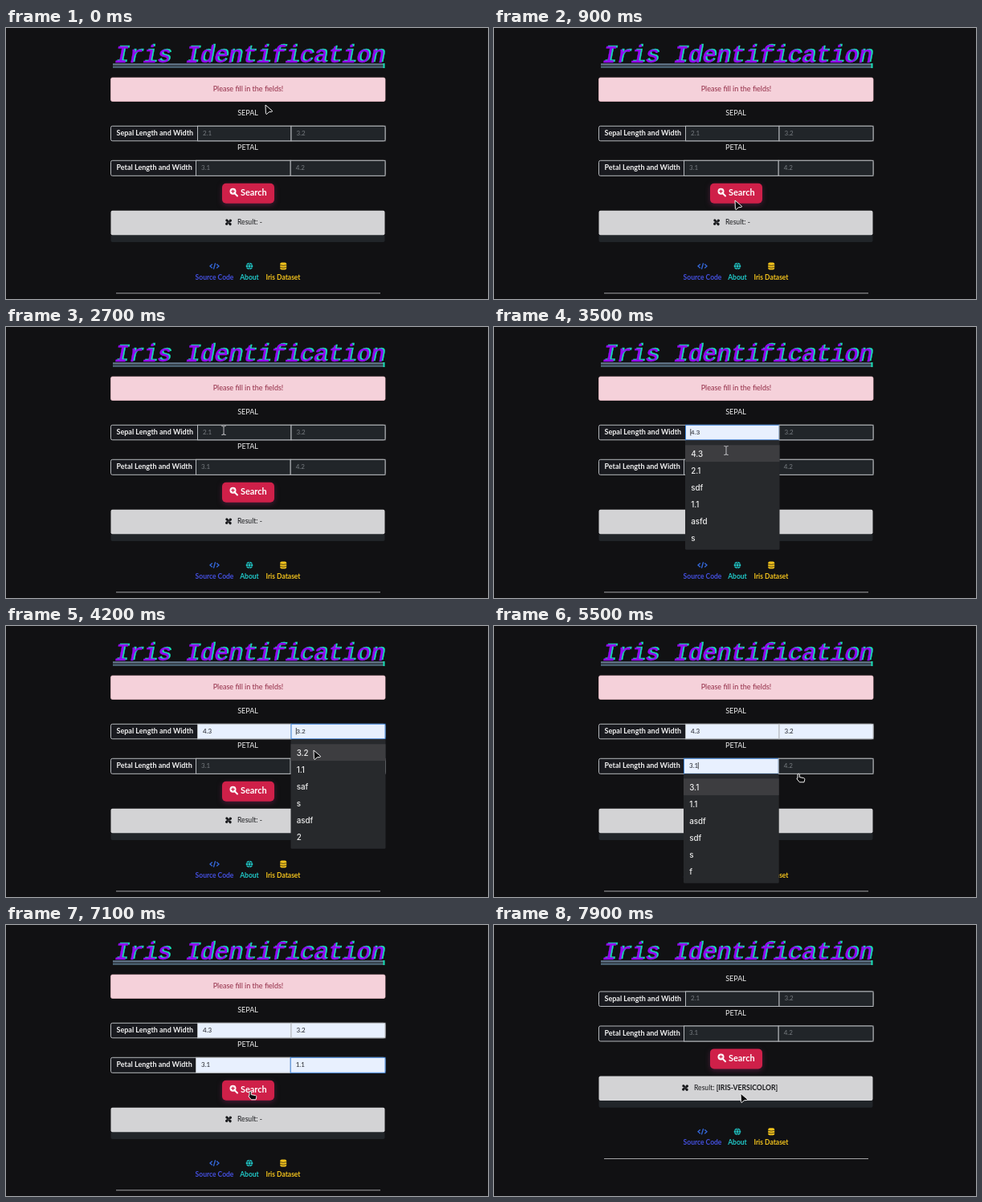
An HTML page for the animation above (8 s loop, 600 by 338 pixels).

```html
<!DOCTYPE html>
<html lang="en">
<head>
<meta charset="utf-8">
<title>Iris Identification</title>
<style>
  html, body { margin: 0; width: 100%; height: 100%; overflow: hidden; background: #111113; }
  svg { display: block; width: 600px; height: 338px; font: 9px Lato, sans-serif; }
  .title { font: italic 29.5px "Liberation Mono", monospace; stroke-width: .4; }
  .bold { font-weight: 700; }
  .mid { text-anchor: middle; }
  .list { font: 500 9.8px Inter, sans-serif; fill: #eee; }
  .link { font-size: 8.5px; font-weight: 700; }
  #button { filter: drop-shadow(0 2px 3px #7a1f5588); }
</style>
</head>
<body>
<svg viewBox="0 0 600 338">
  <rect width="600" height="338" fill="#111113"/>
  <g class="title">
    <text x="137" y="42" fill="#16dfb4" stroke="#16dfb4">Iris Identification</text>
    <text x="135" y="42.5" fill="#9208f0" stroke="#9208f0">Iris Identification</text>
  </g>
  <path d="M133 45.4H471" stroke="#64798d" stroke-width="2.2"/>
  <path d="M133 48.6H471" stroke="#526b7c" stroke-width="2.2"/>
  <path d="M470.5 44V50" stroke="#16dfb4" stroke-width="2"/>

  <g id="alert">
    <rect x="130.5" y="62" width="341.5" height="29.5" rx="2" fill="#f5d1da" stroke="#f3c3cd" stroke-width=".7"/>
    <text class="mid" x="301.5" y="79" fill="#922b45">Please fill in the fields!</text>
  </g>

  <g id="page">
    <g fill="#eee">
      <text class="mid" x="301" y="109">SEPAL</text>
      <text class="mid" x="301" y="152.3">PETAL</text>
    </g>
    <g fill="#191a1f" stroke="#b4b7bb">
      <rect x="130.5" y="122.3" width="341.5" height="18.5" rx="2"/>
      <rect x="130.5" y="165.3" width="341.5" height="19" rx="2"/>
    </g>
    <g class="bold" fill="#f1f1f1">
      <text x="137.5" y="134">Sepal Length and Width</text>
      <text x="137.5" y="177.3">Petal Length and Width</text>
    </g>
    <g id="inputs"></g>

    <g id="button">
      <rect x="269" y="193.7" width="65" height="25" rx="5" fill="#cf2049"/>
      <circle cx="282.5" cy="203.7" r="4" fill="#fff"/>
      <path d="M285 206.5L288 209.5" stroke="#fff" stroke-width="2" stroke-linecap="round"/>
      <path d="M280.3 203.7H284.7M282.5 201.5V205.9" stroke="#cf2049" stroke-width="1.2"/>
      <text class="bold" x="292" y="209" font-size="10.9" fill="#fff">Search</text>
    </g>

    <rect x="130.5" y="257" width="341" height="10" rx="2" fill="#212529"/>
    <rect x="130.5" y="227.7" width="341" height="30.6" rx="2" fill="#d3d3d5"/>
    <g id="result" fill="#18191c" font-size="8.6">
      <g id="fan"></g>
      <text x="11" y="2.7">Result: <tspan id="answer"></tspan></text>
    </g>

    <g class="link">
      <text class="mid" x="259.5" y="313.5" fill="#4450e0">Source Code</text>
      <text class="mid" x="303" y="313.5" fill="#20c9c9">About</text>
      <text class="mid" x="345" y="313.5" fill="#f2c21c">Iris Dataset</text>
    </g>
    <path d="M256.8 294.5L254 297L256.8 299.5M262.2 294.5L265 297L262.2 299.5M260.6 293.3L258.4 300.7" fill="none" stroke="#3569dc" stroke-width="1.3"/>
    <circle cx="303" cy="297" r="4.3" fill="#20c9c9"/>
    <path d="M298.7 295.5H307.3M298.7 298.5H307.3M303 292.7Q299.5 297 303 301.3Q306.5 297 303 292.7" fill="none" stroke="#111113" stroke-width=".6"/>
    <rect x="341.2" y="292.6" width="8" height="9" rx="2" fill="#f2c21c"/>
    <path d="M341 295.6Q345 297 349.5 295.6M341 298.6Q345 300 349.5 298.6" fill="none" stroke="#111113" stroke-width=".7"/>
    <path d="M137 330.8H466" stroke="#a3a3a5"/>
  </g>

  <g id="lists"></g>

  <g id="cursor">
    <path id="arrow" d="M0 0L.4 10.6Q.8 12.2 2 11.1L4.3 8.8L7.8 8.5Q9.3 8.1 8.1 7Z" fill="#08080a" stroke="#f4f4f4" stroke-width="1"/>
    <path id="beam" d="M-2.7-5.5Q0-5.5 0-4V4Q0 5.5-2.7 5.5M2.7-5.5Q0-5.5 0-4M0 4Q0 5.5 2.7 5.5" fill="none" stroke="#b5b5b8" stroke-width="1.1"/>
    <path id="hand" d="M0 1Q1.2-.7 2.3 1V4.6L7.7 5.6Q9 6 8.8 7.5L8 10.8H2.3L-.8 7Q-1.5 5.4 0 5.7Z" fill="#08080a" stroke="#f4f4f4"/>
  </g>
</svg>
<script>
const LOOP = 8000, DONE = 7500;
const $ = id => document.getElementById(id);
const show = (el, on) => el.style.display = on ? '' : 'none';

function add(parent, tag, attrs, text = '') {
  const el = document.createElementNS('http://www.w3.org/2000/svg', tag);
  for (const k in attrs) el.setAttribute(k, attrs[k]);
  el.textContent = text;
  return parent.appendChild(el);
}

// open: list appears, hover: value previewed, pick: value kept, close: list gone
const fields = [
  { x: 238.5, y: 122.3, r: 355, hint: '2.1', options: '4.3 2.1 sdf 1.1 asfd s', open: 3000, hover: 3300, pick: 3700, close: 3700 },
  { x: 355, y: 122.3, r: 472, hint: '3.2', options: '3.2 1.1 saf s asdf 2', open: 4000, hover: 4100, pick: 4450, close: 4450 },
  { x: 236.5, y: 165.3, r: 354.2, hint: '3.1', options: '3.1 1.1 asdf sdf s f', open: 4850, hover: 5000, pick: 5300, close: 5600 },
  { x: 354.2, y: 165.3, r: 472, hint: '4.2', options: '1.1 4.2 s asdf x 4', open: 5900, hover: 6050, pick: 6450, close: 6450 }
];

fields.forEach((f, i) => {
  const { x, y } = f, width = f.r - x, height = y < 150 ? 18.5 : 19;
  const words = f.options.split(' ');
  f.value = words[0];
  f.blur = i < 3 ? fields[i + 1].open : DONE;
  f.box = add($('inputs'), 'rect', { x, y, width, height });
  f.text = add($('inputs'), 'text', { x: x + 6.5, y: y + 11.5, 'font-size': 8 });
  f.caret = add($('inputs'), 'path', { stroke: '#222', 'stroke-width': .8 });

  f.list = add($('lists'), 'g', { class: 'list' });
  const top = y + 19;
  add(f.list, 'rect', { x: x - .5, y: top, width: width + 1, height: 136.5, rx: 1.5, fill: '#27292c' });
  f.row = add(f.list, 'rect', { x: x - .5, y: top + 6, width: width + 1, height: 20.8, fill: '#3d3d40' });
  words.forEach((w, n) => add(f.list, 'text', { x: x + 6.7, y: top + 20.2 + n * 21.05 }, w));
});

for (let a = 20; a < 380; a += 90)
  add($('fan'), 'path', { d: 'M0 0Q-1-5 2.2-4.3Q4.5-3 1.5-.3Z', transform: `rotate(${a})` });

const path = [
  [0, 323, 96], [450, 82, 170], [900, 300, 215], [1300, 530, 170], [1700, 403, 81],
  [2700, 271, 129], [3100, 271, 130], [3500, 289, 154], [3700, 287, 157],
  [3980, 400, 132], [4200, 383, 155], [4450, 380, 158], [4800, 290, 175],
  [5050, 285, 200], [5300, 285, 201], [5500, 378, 184], [5880, 385, 174],
  [6200, 377, 201], [6450, 376, 203], [6950, 303, 207], [7500, 303, 207],
  [7900, 307, 210], [8000, 307, 210]
];

function cursorAt(t) {
  const i = path.findIndex(p => p[0] > t);
  const [t0, x0, y0] = path[i - 1], [t1, x1, y1] = path[i];
  const u = (t - t0) / (t1 - t0), e = u * u * (3 - 2 * u);
  return [x0 + (x1 - x0) * e, y0 + (y1 - y0) * e];
}

function drawField(f, t) {
  const done = t >= DONE, kept = t >= f.pick && !done;
  const focus = t >= f.open && t < f.blur;
  const preview = t >= f.hover && t < f.pick;
  const lit = kept || preview;
  f.box.setAttribute('fill', lit ? '#e8f0fe' : '#212529');
  f.box.setAttribute('stroke', focus ? '#4387dc' : '#b4b7bb');
  f.text.textContent = lit ? f.value : f.hint;
  f.text.setAttribute('fill', lit ? '#202228' : '#777c80');
  f.text.setAttribute('font-family', preview ? 'Liberation Sans, sans-serif' : 'Lato, sans-serif');
  f.caret.setAttribute('d', `M${f.x + (kept ? 17.8 : 6.3)} ${f.y + 4.7}v8.5`);
  f.caret.setAttribute('stroke', lit ? '#222' : '#ddd');
  show(f.caret, focus && t < f.close);
  show(f.list, t >= f.open && t < f.close);
  show(f.row, t >= f.hover);
}

function draw(t) {
  const done = t >= DONE;
  show($('alert'), !done);
  $('page').setAttribute('transform', `translate(0 ${done ? -39.3 : 0})`);
  $('result').setAttribute('transform', `translate(${done ? 238 : 277} 242.3)`);
  $('answer').textContent = done ? '[IRIS-VERSICOLOR]' : '-';
  $('answer').setAttribute('class', done ? 'bold' : '');
  fields.forEach(f => drawField(f, t));

  const [x, y] = cursorAt(t);
  const within = (a, b) => t >= a && t < b;
  const hand = within(5400, 5700) || within(6850, DONE);
  const beam = within(2650, 3800) || within(3900, 4080) || within(4700, 4980) || within(5700, 6000);
  $('cursor').setAttribute('transform', `translate(${x} ${y})`);
  show($('hand'), hand);
  show($('beam'), beam);
  show($('arrow'), !hand && !beam);
}

function frame() {
  draw(performance.now() % LOOP);
  requestAnimationFrame(frame);
}
frame();
</script>
</body>
</html>
```
